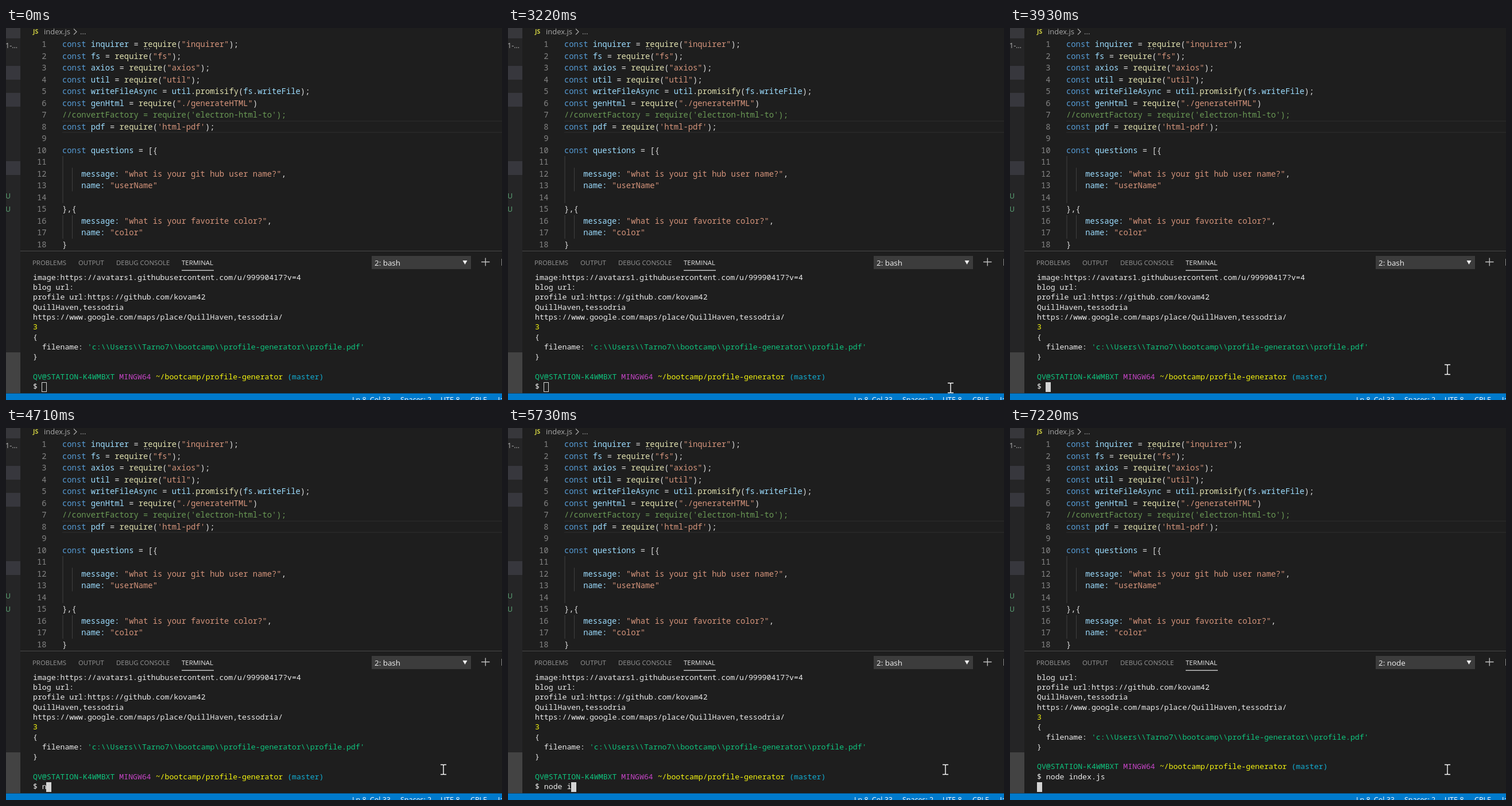
Recreate the animation shown at these times as an HTML page. Size 864 by 648 pixels, loop 8000 ms.

```html
<!DOCTYPE html>
<html lang="en">
<head>
<meta charset="utf-8">
<title>Editor and terminal</title>
<style>
html, body { margin: 0; width: 100%; height: 100%; overflow: hidden; background: #1e1e1e; }
svg { display: block; width: 864px; height: 648px; }
text { white-space: pre; font-family: "Open Sans", "Noto Sans", sans-serif; }
.code text { font: 500 13.84px "Noto Sans Mono", monospace; }
.term text { font: 500 13.2px "Noto Sans Mono", monospace; }
.tab { font-size: 11.4px; }
.status { font-size: 12.5px; }
</style>
</head>
<body>
<svg id="stage" viewBox="0 0 864 648" xml:space="preserve"></svg>
<script>
const LOOP = 8000, ROW = 17.28, COL = 7.92, LEFT = 47, LAST = 629;
const LINE = 20.53, FIRST = 33;

const code = `const inquirer = require("inquirer");
const fs = require("fs");
const axios = require("axios");
const util = require("util");
const writeFileAsync = util.promisify(fs.writeFile);
const genHtml = require("./generateHTML")
//convertFactory = require('electron-html-to');
const pdf = require('html-pdf');

const questions = [{

    message: "what is your git hub user name?",
    name: "userName"

},{
    message: "what is your favorite color?",
    name: "color"
}`.split("\n");

const FG = "#ececec", GREEN = "#0fc67f", YELLOW = "#f5f510";
const history = [
  [[FG, "image:https://avatars1.githubusercontent.com/u/99990417?v=4"]],
  [[FG, "blog url:"]],
  [[FG, "profile url:https://github.com/kovam42"]],
  [[FG, "QuillHaven,tessodria"]],
  [[FG, "https://www.google.com/maps/place/QuillHaven,tessodria/"]],
  [[YELLOW, "3"]],
  [[FG, "{"]],
  [[FG, "  filename: "], [GREEN, "'c:\\\\Users\\\\Tarno7\\\\bootcamp\\\\profile-generator\\\\profile.pdf'"]],
  [[FG, "}"]],
  [],
  [[GREEN, "QV@STATION-K4WMBXT "], ["#c545c5", "MINGW64 "],
   [YELLOW, "~/bootcamp/profile-generator "], ["#12aed4", "(master)"]]
];

const rect = (x, y, w, h, fill) => `<rect x="${x}" y="${y}" width="${w}" height="${h}" fill="${fill}"/>`;
const text = (x, y, fill, body, attrs = "") => `<text x="${x}" y="${y}" fill="${fill}" ${attrs}>${body}</text>`;
const span = (fill, body) => `<tspan fill="${fill}">${body}</tspan>`;

const syntax = /(\/\/.*)|("[^"]*"|'[^']*')|\b(const)\b|\b(require|promisify)\b|(\w+:?)/g;
const hues = ["#6a9955", "#d6957c", "#569cd6", "#e2e2b0", "#9cdcfe"];
const paint = line => line.replace(syntax, (word, ...groups) =>
  span(hues[groups.findIndex(g => g !== undefined)], word));

const sidebar = rect(0, 0, 25, 636, "#252526") + rect(0, 0, 25, 18, "#37373b") +
  [66, 113, 232].map(y => rect(0, y, 25, 24, "#37373d")).join("") +
  rect(0, 565, 25, 71, "#434343") +
  text(-1, 35, "#b8b8b8", "1-...", 'font-size="12.5"') +
  [297, 320].map(y => text(-1, y, "#5ca877", "U", 'font-size="12.5"')).join("");

const breadcrumb = text(47, 10, "#cbcb41", "JS", 'font-size="10.5" font-weight="700"') +
  text(66, 11, "#a9a9a9", "index.js", 'font-size="13"') +
  '<path d="M118 1.5l5 5-5 5" fill="none" stroke="#a9a9a9" stroke-width="1.2"/>' +
  text(129, 11, "#a9a9a9", "...", 'font-size="13"');

const guides = [[98.5, 223, 82], [115, 243.5, 41], [98.5, 326, 41], [115, 326, 41]]
  .map(([x, y, h]) => rect(x, y, 1, h, "#404040")).join("");

const editor = rect(98, 161.5, 766, 1.5, "#292929") + rect(98, 181, 766, 1.5, "#292929") + guides +
  '<g class="code">' + code.map((line, i) => {
    const y = FIRST + i * LINE;
    return text(70.5, y, "#858585", i + 1, 'text-anchor="end"') + text(98, y, "#dcdcdc", paint(line));
  }).join("") + "</g>" +
  [241, 245, 249].map(x => rect(x, 35.5, 1.5, 1.5, "#a0a0a0")).join("");

const tabs = [[46, "PROBLEMS"], [126, "OUTPUT"], [192, "DEBUG CONSOLE"], [306, "TERMINAL"]]
  .map(([x, name], i) => text(x, 413, i == 3 ? "#e7e7e7" : "#969696", name, 'class="tab"')).join("");

const panel = rect(25, 388, 839, 1, "#4a4a4a") + tabs + rect(306, 421.6, 56, 1.2, "#e7e7e7") +
  rect(637, 397, 173, 23, "#3c3c3c") +
  text(642, 414, "#f0f0f0", "2: bash", 'id="shell" font-size="13.4"') +
  '<path d="M795.5 405h8l-4 7z" fill="#f0f0f0"/>' +
  '<path d="M828 407.5h14.5M835.25 400.5v14" stroke="#c5c5c5" stroke-width="1.3"/>' +
  rect(863, 402, 1, 12, "#8a8a8a");

const terminal = '<g class="term"><g id="rows">' + history.map((parts, i) =>
    text(LEFT, LAST - (history.length - i) * ROW, FG, parts.map(p => span(...p)).join(""))).join("") +
  text(LEFT, LAST, FG, "", 'id="command"') + "</g></g>" +
  '<rect id="caret" y="617.5" width="8" height="16" stroke="#d4d4d4"/>';

const status = rect(0, 636.5, 864, 11.5, "#007acc") +
  [[603, "Ln 8, Col 33"], [687, "Spaces: 2"], [757, "UTF-8"], [809, "CRLF"], [857, "JavaScript"]]
    .map(([x, label]) => text(x, 651.7, "#fff", label, 'class="status"')).join("");

const pointer = '<g id="pointer"><circle id="press" cx="-2" cy="-1" r="12.5" fill="#ff0" fill-opacity=".47"/>' +
  '<path d="M-5-8.5h4l1 1 1-1h4M0-7.5v15M-5 8.5h4l1-1 1 1h4" fill="none" stroke="#fff" stroke-width="1.4"/></g>';

const $ = id => document.getElementById(id);
$("stage").innerHTML = rect(0, 0, 864, 648, "#1e1e1e") +
  sidebar + breadcrumb + editor + panel + terminal + status + pointer;

// Each entry holds from its time until the next one.
const moves = [[0, 785, 670], [340, 791, 645], [420, 774, 637], [490, 758, 631], [570, 771, 628],
  [3220, 771, 627], [3290, 770, 620], [3370, 767, 609], [3440, 764, 600], [3520, 762, 595]];
const typed = [[0, ""], [4710, "n"], [4940, "no"], [5110, "nod"], [5260, "node"], [5570, "node "],
  [5730, "node i"], [5880, "node in"], [6280, "node index.js "]];
const at = (steps, t) => steps.filter(s => s[0] <= t).pop();

function draw(now) {
  const t = now % LOOP, sent = t >= 7220;
  const [, x, y] = at(moves, t);
  const line = "$ " + at(typed, t)[1];

  $("pointer").setAttribute("transform", `translate(${x} ${y})`);
  $("press").setAttribute("visibility", t >= 3690 && t < 3930 ? "visible" : "hidden");

  $("command").textContent = line;
  $("rows").setAttribute("transform", `translate(0 ${sent ? -ROW : 0})`);
  $("rows").firstChild.setAttribute("visibility", sent ? "hidden" : "visible");
  $("shell").textContent = sent ? "2: node" : "2: bash";

  $("caret").setAttribute("x", Math.floor(LEFT + (sent ? 0 : line.length * COL)) + 0.5);
  $("caret").setAttribute("fill", t >= 3790 ? "#d4d4d4" : "none");
  requestAnimationFrame(draw);
}
draw(performance.now());
</script>
</body>
</html>
```
